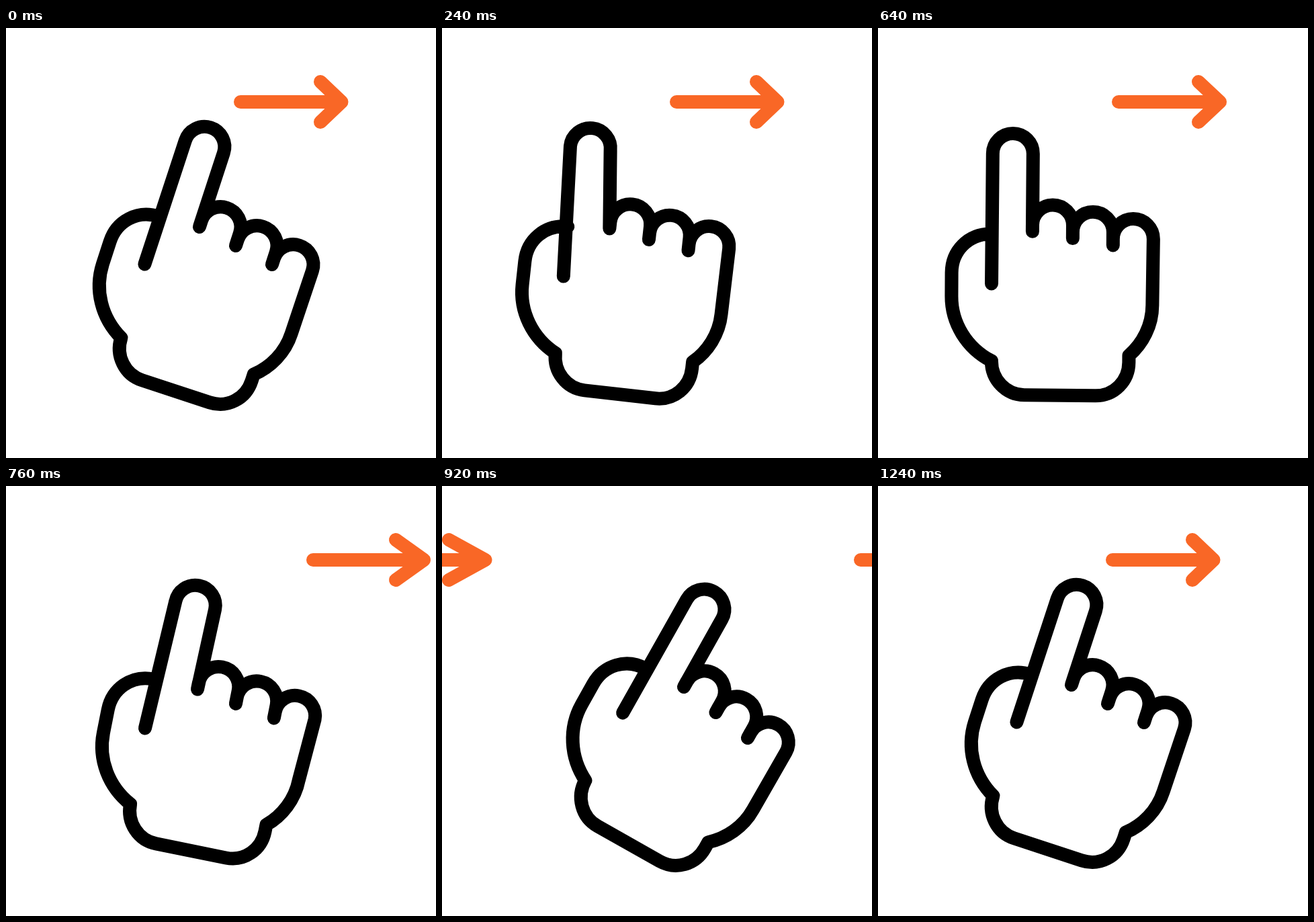
Write an HTML page with a canvas that moves like this. It is 640x640 px and loops after 1.48 s.

```html
<!DOCTYPE html>
<html lang="en">
<head>
<meta charset="utf-8">
<title>Swipe right</title>
<style>
  html, body { margin: 0; height: 100%; overflow: hidden; background: #fff; }
  canvas { display: block; width: 100vw; height: 100vh; }
</style>
</head>
<body>
<canvas id="stage" width="640" height="640"></canvas>
<script>
const ctx = document.getElementById('stage').getContext('2d');
const LOOP = 1480, STEP = 40;

// time, palm x, palm y, angle in degrees, fingertip bend, knuckle drop
const handKeys = [
  [40, 289, 419.3, 17.95, 0, 0],
  [240, 275.5, 419, 6.2, -11.6, 0],
  [320, 266, 420, -0.5, -1, 0],
  [400, 268, 420, 0, 0, 0],
  [600, 268, 420, 0, 0, 0],
  [640, 268.3, 420, 0.3, 0, 0],
  [760, 297, 418, 11.2, 7, 6],
  [920, 336.9, 420.2, 29.2, 0, 0],
  [1080, 311.5, 421, 22.4, 0, 0],
  [1240, 289, 419.3, 17.95, 0, 0]
];

// time, tail x, barb x, tip x
const leavingKeys = [
  [600, 349, 468, 499.5],
  [640, 358, 477, 509],
  [760, 457, 580, 622],
  [920, 623, 748, 802],
  [1000, 740, 900, 960]
];
const enteringKeys = [
  [720, -430, -300, -240],
  [920, -121, 10, 64.5],
  [1080, 132, 263, 304],
  [1240, 349, 468, 499.5]
];

// Monotone cubic interpolation of every column at time t
function sample(keys, t) {
  const last = keys.length - 1;
  if (t <= keys[0][0]) return keys[0].slice(1);
  if (t >= keys[last][0]) return keys[last].slice(1);
  const i = keys.findIndex(k => k[0] > t) - 1;
  const span = keys[i + 1][0] - keys[i][0];
  const u = (t - keys[i][0]) / span;
  const slope = (j, c) => (keys[j + 1][c] - keys[j][c]) / (keys[j + 1][0] - keys[j][0]);
  const tangent = (j, c) => {
    if (j === 0 || j === last) return 0;
    const a = slope(j - 1, c), b = slope(j, c);
    return a * b > 0 ? 2 * a * b / (a + b) : 0;
  };
  return keys[i].slice(1).map((from, n) => {
    const c = n + 1, to = keys[i + 1][c];
    return from + (to - from) * u * u * (3 - 2 * u)
      + span * u * (1 - u) * (tangent(i, c) * (1 - u) - tangent(i + 1, c) * u);
  });
}

function drawArrow([tail, barb, tip]) {
  ctx.strokeStyle = '#f96726';
  ctx.beginPath();
  ctx.moveTo(tail, 110);
  ctx.lineTo(tip, 110);
  ctx.moveTo(barb, 80);
  ctx.lineTo(tip, 110);
  ctx.lineTo(barb, 140);
  ctx.stroke();
}

function drawHand([x, y, angle, bend, drop]) {
  ctx.save();
  ctx.translate(x, y);
  ctx.rotate(angle * Math.PI / 180);
  ctx.translate(-268, -420);
  ctx.strokeStyle = '#000';
  ctx.beginPath();

  // index finger
  ctx.moveTo(168.5, 381);
  ctx.arc(199.3 + bend, 187.3, 30, Math.PI, 0);

  // three folded fingers
  for (let i = 0; i < 3; i++) {
    const kx = 229 + 60 * i + drop * 0.8, ky = 303 + 10 * i + drop;
    ctx.lineTo(kx, ky);
    ctx.arc(kx + 30, ky - 9.5, 30, Math.PI, 0);
  }

  // palm, wrist and thumb
  ctx.lineTo(408, 412);
  ctx.bezierCurveTo(408, 442, 394, 469, 373.5, 487);
  ctx.lineTo(373.5, 497);
  ctx.bezierCurveTo(373.5, 525, 352, 547, 324, 547);
  ctx.lineTo(218, 546.5);
  ctx.bezierCurveTo(191, 546.5, 169, 524, 169, 496);
  ctx.bezierCurveTo(132, 477, 109, 440, 109, 400);
  ctx.lineTo(109, 365);
  ctx.bezierCurveTo(109, 333, 133, 307, 167, 307);
  ctx.stroke();
  ctx.restore();
}

function frame(now) {
  const t = Math.floor(now % LOOP / STEP) * STEP;
  ctx.fillStyle = '#fff';
  ctx.fillRect(0, 0, 640, 640);
  ctx.lineWidth = 20;
  ctx.lineCap = ctx.lineJoin = 'round';
  drawArrow(sample(leavingKeys, t));
  drawArrow(sample(enteringKeys, t));
  drawHand(sample(handKeys, t));
  requestAnimationFrame(frame);
}
requestAnimationFrame(frame);
</script>
</body>
</html>
```
